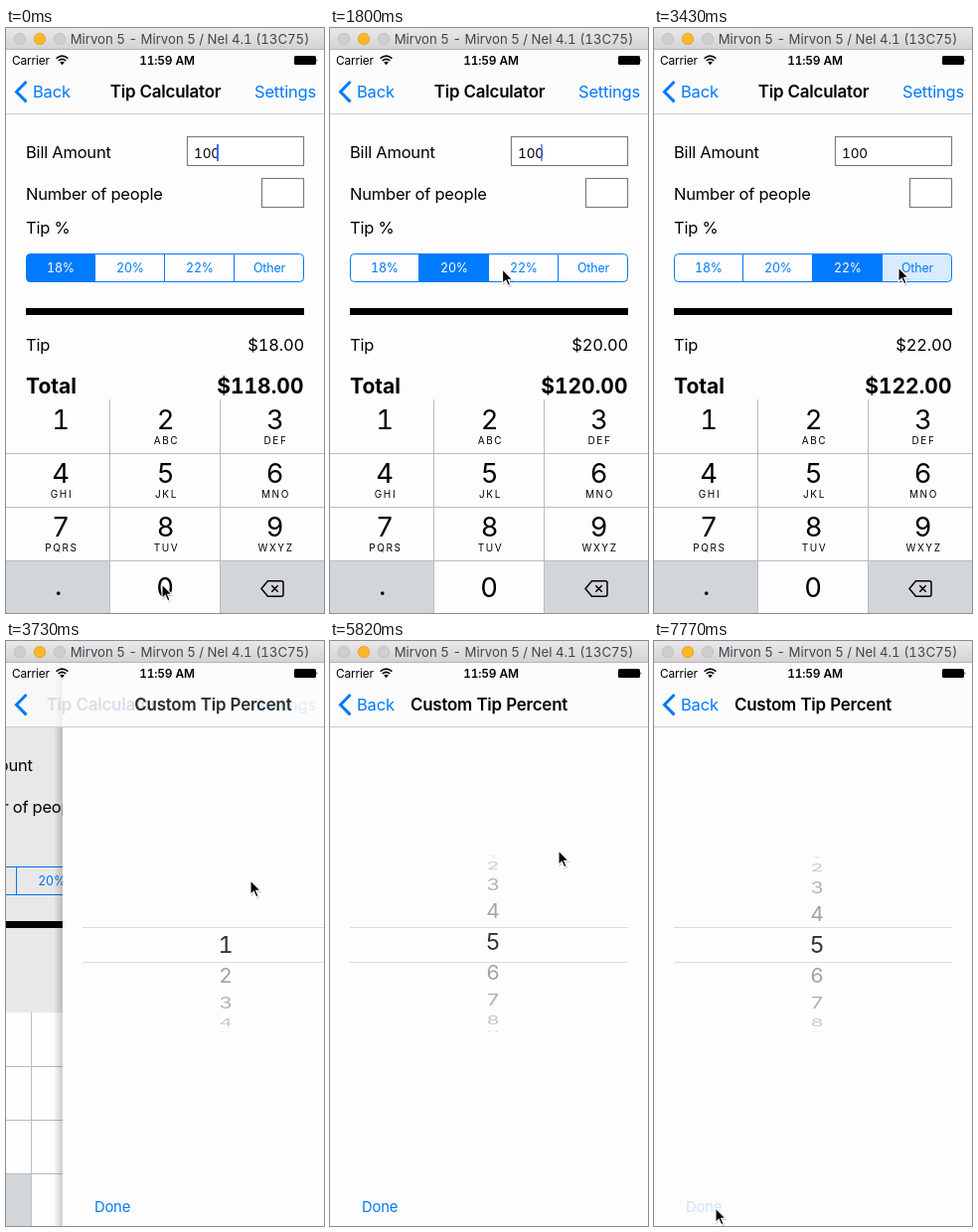
An HTML page that plays this animation: 320x589 px, repeating every 8000 ms.

```html
<!DOCTYPE html>
<html lang="en">
<head>
<meta charset="utf-8">
<title>Tip Calculator</title>
<style>
  html, body { margin: 0; width: 100%; height: 100%; overflow: hidden; background: #fdfdfd; }
  svg { display: block; width: 100%; height: 100%; }
  text {
    font: 400 16.5px Inter, Roboto, sans-serif; font-variant-numeric: tabular-nums;
    letter-spacing: -.012em; white-space: pre;
  }
  .mid { text-anchor: middle; }
  .end { text-anchor: end; }
  .blue { fill: #007aff; }
  .title { font-size: 16.9px; font-weight: 600; }
  .small { font-size: 11.9px; }
  .window { font-size: 13.2px; letter-spacing: 0; }
  .field { font-size: 13.6px; }
  .seg { font-size: 12.4px; }
  .total { font-size: 21px; font-weight: 700; letter-spacing: 0; }
  .key { font-size: 27.4px; }
  .sub { font-size: 10px; letter-spacing: .16em; }
  .done { font-size: 14.8px; }
  .wheel { font-size: 21px; }
  .wheel.big { font-size: 23.4px; }
</style>
</head>
<body>
<svg viewBox="0 0 320 589" preserveAspectRatio="none">
  <defs>
    <linearGradient id="chrome" x2="0" y2="1">
      <stop stop-color="#eae8eb"/><stop offset="1" stop-color="#d3d1d4"/>
    </linearGradient>
    <linearGradient id="shade">
      <stop stop-opacity="0"/><stop offset="1" stop-opacity=".2"/>
    </linearGradient>
    <clipPath id="band"><rect x="20" y="289" width="280" height="34"/></clipPath>
    <clipPath id="rest"><path d="M20 214H300V288H20ZM20 324H300V394H20Z"/></clipPath>
  </defs>

  <rect width="320" height="589" fill="#fdfdfd"/>

  <g id="calc">
    <text x="20" y="131">Bill Amount</text>
    <text x="20" y="173">Number of people</text>
    <text x="20" y="207">Tip %</text>
    <g fill="#fff" stroke="#7d7d7d" stroke-width="1.2">
      <rect x="182.5" y="109.5" width="117" height="29"/>
      <rect x="257.5" y="151.5" width="42" height="29"/>
    </g>
    <text class="field" x="189" y="130.5">100</text>
    <rect id="caret" x="212" y="117" width="2" height="17" fill="#426bf2"/>
    <g id="segs"></g>
    <rect x="20" y="282" width="280" height="7"/>
    <text x="20" y="325">Tip</text>
    <text id="tip" class="end" x="300" y="325"></text>
    <text class="total" x="20" y="367.5">Total</text>
    <text id="total" class="total end" x="299.5" y="367.5"></text>
    <rect id="dim" y="22" width="420" height="352" opacity="0"/>
    <g id="keys"></g>
  </g>

  <g id="custom">
    <rect x="-9" y="22" width="9" height="567" fill="url(#shade)"/>
    <rect y="22" width="320" height="567" fill="#fdfdfd"/>
    <g id="wheel" clip-path="url(#rest)"></g>
    <g id="centre" clip-path="url(#band)"></g>
    <path d="M20 288.5H300M20 323.5H300" stroke="#dcdcdc"/>
    <text id="done" class="done blue" x="32" y="574.5">Done</text>
  </g>

  <rect y="22" width="320" height="64" fill="#fdfdfd" fill-opacity=".8"/>
  <path d="M0 86.5H320" stroke="#cdcdcd"/>
  <path d="M20.5 54L10.5 64.2L20.5 74.4" fill="none" stroke="#007aff" stroke-width="3"/>
  <text id="back" class="blue" x="27" y="70">Back</text>
  <text id="oldTitle" class="title mid" x="160.5" y="70">Tip Calculator</text>
  <text id="newTitle" class="title mid" x="160" y="70">Custom Tip Percent</text>
  <text id="settings" class="blue end" x="312" y="70">Settings</text>

  <text class="small" x="6" y="37">Carrier</text>
  <path d="M50.6 30.6Q56.5 25.8 62.4 30.6M52.7 33Q56.5 29.8 60.3 33" fill="none" stroke="#000" stroke-width="1.6"/>
  <path d="M54.2 34.6Q56.5 32.8 58.8 34.6L56.5 37.2Z"/>
  <text class="small mid" font-weight="600" x="162" y="37" style="font-weight:600">11:59 AM</text>
  <rect x="290" y="28" width="22" height="9" rx="1.5"/>
  <path d="M312.6 30.8Q314.2 32.5 312.6 34.2Z"/>

  <rect width="320" height="22" fill="url(#chrome)"/>
  <path d="M0 21.5H320" stroke="#b7b5b8"/>
  <g stroke-width=".8">
    <circle cx="14" cy="11" r="5.7" fill="#d0ced1" stroke="#bcbabd"/>
    <circle cx="34" cy="11" r="5.7" fill="#fdb827" stroke="#dfa023"/>
    <circle cx="54" cy="11" r="5.7" fill="#d0ced1" stroke="#bcbabd"/>
  </g>
  <text class="window mid" x="185" y="16" fill="#454346">Mirvon 5 - Mirvon 5 / Nel 4.1 (13C75)</text>

  <g id="cursor">
    <path d="M0 0V14.4L3.3 11.3L5.7 16.7L8 15.7L5.7 10.4H10.2Z" transform="translate(.6 1.2)" opacity=".2" stroke="#000"/>
    <path d="M0 0V14.4L3.3 11.3L5.7 16.7L8 15.7L5.7 10.4H10.2Z" stroke="#fff" stroke-width="1.1"/>
  </g>
</svg>

<script>
const LOOP = 8000, STEP = 150;
const el = Object.fromEntries([...document.querySelectorAll('[id]')].map(e => [e.id, e]));
const clamp = (v, a = 0, b = 1) => Math.min(b, Math.max(a, v));
const smooth = u => u * u * (3 - 2 * u);
const move = (e, x, y = 0) => e.setAttribute('transform', `translate(${x} ${y})`);
const fade = (e, a) => e.setAttribute('opacity', clamp(a));

const RUNS = [[0, 17], [2530, 1], [2830, 11], [4630, 5], [5370, 1], [5820, 10], [7770, 1]];
function snap(t) {
  const [start, n] = RUNS.filter(r => r[0] <= t).pop();
  return start + STEP * Math.min(n - 1, Math.floor((t - start) / STEP));
}

// Pointer stops: [time, x, y]
const PATH = [
  [0, 157, 560], [900, 112, 242], [1350, 112, 242], [1950, 185, 243], [2250, 185, 243],
  [2530, 246, 241], [3730, 246, 241], [4330, 230, 345], [4630, 230, 345], [5370, 230, 211],
  [5820, 230, 211], [6420, 40, 562], [6570, 37, 565], [6720, 56, 572], [7170, 62, 571]
];
function pointer(t) {
  const i = PATH.findIndex(p => p[0] > t);
  if (i < 0) return PATH[PATH.length - 1].slice(1);
  const [t0, x0, y0] = PATH[i - 1], [t1, x1, y1] = PATH[i];
  const u = smooth((t - t0) / (t1 - t0));
  return [x0 + (x1 - x0) * u, y0 + (y1 - y0) * u];
}

// Segmented control
const RATES = [18, 20, 22];
const LABELS = [...RATES.map(r => r + '%'), 'Other'];
const cell = i => i === 0 ? 'M90 227.5H24.5Q20.5 227.5 20.5 231.5V251.5Q20.5 255.5 24.5 255.5H90Z'
  : i === 3 ? 'M229.5 227.5H295.5Q299.5 227.5 299.5 231.5V251.5Q299.5 255.5 295.5 255.5H229.5Z'
  : `M${19.5 + 70 * i} 227.5h70v28h-70Z`;
el.segs.innerHTML = LABELS.map((s, i) =>
  `<path d="${cell(i)}" stroke="#007aff"/><text class="seg mid" x="${55 + 70 * i}" y="246">${s}</text>`).join('');
const cells = el.segs.querySelectorAll('path'), names = el.segs.querySelectorAll('text');

function drawSegments(sel, pressed) {
  LABELS.forEach((_, i) => {
    cells[i].setAttribute('fill', i === sel ? '#007aff' : i === pressed ? '#d8ebff' : '#fdfdfd');
    names[i].setAttribute('fill', i === sel ? '#fff' : '#007aff');
  });
  el.tip.textContent = `$${RATES[sel]}.00`;
  el.total.textContent = `$${100 + RATES[sel]}.00`;
}

// Number pad
const SUBS = ['', 'ABC', 'DEF', 'GHI', 'JKL', 'MNO', 'PQRS', 'TUV', 'WXYZ'];
const COLS = [55, 160.5, 270.5];
el.keys.innerHTML = `
  <rect y="374" width="320" height="215" fill="#fdfdfd"/>
  <path d="M0 537H104V589H0ZM216 537H320V589H216Z" fill="#d2d5da"/>
  <path d="M0 428.5H320M0 482.5H320M0 536.5H320M104.5 374V589M215.5 374V589" stroke="#b9bbbf"/>` +
  SUBS.map((s, i) => {
    const x = COLS[i % 3], y = 404 + 54 * Math.floor(i / 3);
    return `<text class="key mid" x="${x}" y="${y}">${i + 1}</text>
      <text class="sub mid" x="${x + 1}" y="${y + 15}">${s}</text>`;
  }).join('') + `
  <text class="key mid" x="160" y="573">0</text>
  <text class="key mid" x="52.5" y="571">.</text>
  <path d="M263.5 556.8H277Q279 556.8 279 558.8V570.2Q279 572.2 277 572.2H263.5L257 564.5Z
    M267.3 561.3L273.7 567.7M273.7 561.3L267.3 567.7" fill="none" stroke="#000" stroke-width="1.5"/>`;

// Picker: rows on a cylinder seen from the front
const RADIUS = 90, MID = 306, PITCH = Math.PI / 9;
function rows(pos, big) {
  let out = '';
  for (let n = 1; n < 11; n++) {
    const a = (n - 1 - pos) * PITCH, c = Math.cos(a);
    if (Math.abs(a) > 1.5) continue;
    const y = MID + RADIUS * Math.sin(a), alpha = big ? .8 : .38 * (.1 + .9 * c);
    out += `<text class="wheel mid${big ? ' big' : ''}" y="${big ? 8.4 : 7.6}" fill-opacity="${alpha}"
      transform="translate(164 ${y}) scale(1 ${c})">${n}</text>`;
  }
  return out;
}
let shown = -1;
function drawPicker(pos) {
  if (pos === shown) return;
  shown = pos;
  el.wheel.innerHTML = rows(pos, false);
  el.centre.innerHTML = rows(pos, true);
}

// Critically damped push
function push(t) {
  const x = Math.max(0, t - 3505) * .014;
  return t > 4300 ? 1 : 1 - (1 + x) * Math.exp(-x);
}

function draw(t) {
  const [x, y] = pointer(t);
  move(el.cursor, x, y);

  const sel = t < 1200 ? 0 : t < 2250 ? 1 : 2;
  const pressed = t < 1050 ? -1 : t < 1200 ? 1 : t < 2100 ? -1 : t < 2250 ? 2 : t < 3400 ? -1 : 3;
  drawSegments(sel, pressed);
  fade(el.caret, .4 + .9 * Math.cos(t / 500 * Math.PI));

  const p = push(t);
  move(el.calc, -96 * p);
  fade(el.dim, .1 * p);
  move(el.custom, 320 * (1 - p));
  fade(el.custom, p > 0 ? 1 : 0);
  move(el.oldTitle, -78 * p);
  move(el.newTitle, 272 * (1 - p));
  el.oldTitle.setAttribute('fill', p > .1 ? '#2f5f95' : '#000');
  fade(el.oldTitle, 1 - p);
  fade(el.newTitle, p);
  fade(el.settings, (1 - p) * (1 - .4 * p));
  fade(el.back, Math.max(1 - 2.5 * p, (p - .85) / .14));

  const drag = t < 4630 ? 0 : clamp((345 - y) / 32.7, 0, 4.1);
  drawPicker(t < 5820 ? drag : 4 + .098 * (1 - smooth(clamp((t - 5820) / 300))));
  fade(el.done, t < 7770 ? 1 : .2);
}

const begin = performance.now();
function tick() {
  draw(snap((performance.now() - begin) % LOOP));
  requestAnimationFrame(tick);
}
tick();
</script>
</body>
</html>
```
